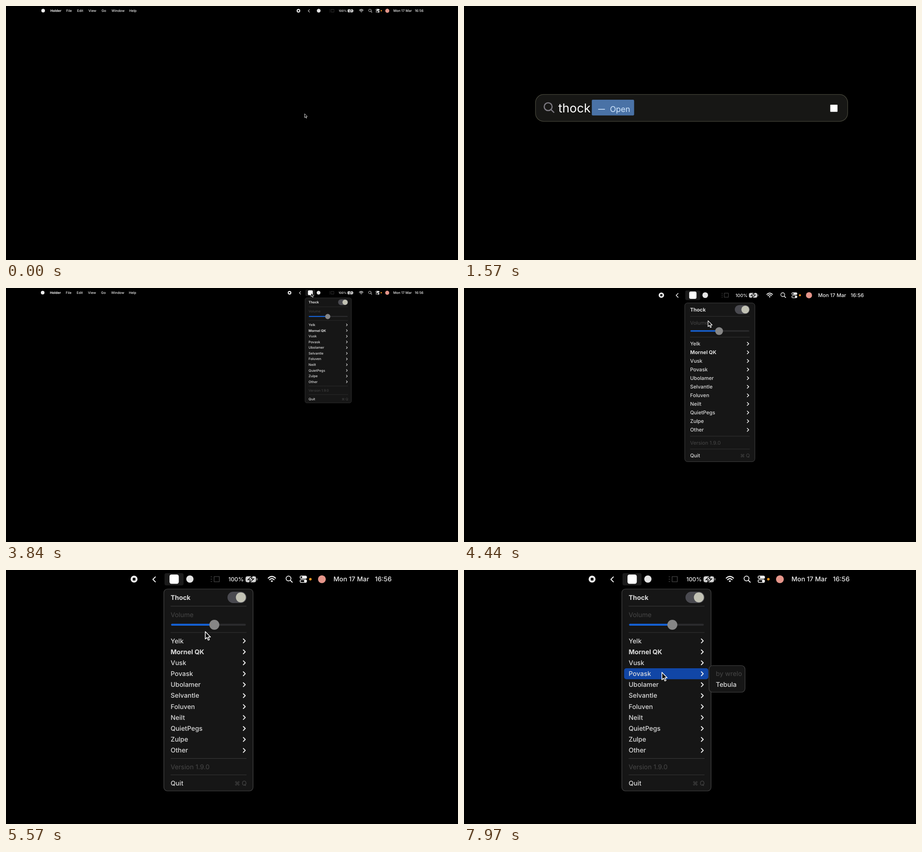
Recreate the animation shown at these times as an HTML page. Size 998x561 px, loop 8000 ms.

```html
<!DOCTYPE html>
<html lang="en">
<head>
<meta charset="utf-8">
<title>Menu bar demo</title>
<style>
  html, body { margin: 0; width: 100%; height: 100%; overflow: hidden; background: #000; }
  svg { display: block; width: 100vw; height: 100vh; }
  text { font: 500 14.3px Inter, "Open Sans", sans-serif; fill: #dcdcdc; white-space: pre; text-rendering: geometricPrecision; }
  .bar text { fill: #f0f0f0; }
  .apps text { font-size: 7.43px; }
  text.bold, .apps text.bold { font-weight: 700; }
  text.dim { fill: #474747; font-weight: 400; }
  text.tag { font-size: 11px; font-weight: 700; text-anchor: middle; }
  .line { fill: none; stroke: #f0f0f0; stroke-width: 2; stroke-linecap: round; stroke-linejoin: round; }
  .rule { stroke: #363636; stroke-width: 1.2; }
  .panel { fill: #161616; stroke: #464646; stroke-width: 1.2; }
  #query { font-size: 27px; font-weight: 400; fill: #fff; }
  #hint text { font-size: 17.5px; font-weight: 400; fill: #d3e8ff; }
</style>
</head>
<body>
<svg viewBox="0 0 998 561" preserveAspectRatio="none">
  <g id="world"></g>
  <g id="spotlight"></g>
</svg>
<script>
const LOOP = 8000, WIDTH = 998;
const ZOOM = 1.925;            // the desktop is drawn at this magnification
const SEARCH_ZOOM = 1.77;      // the search field is drawn at this one
const SEARCH_CENTER = [494.5, 100], MENU_CENTER = [WIDTH, 0];
const ROW = 24.18, FIRST_ROW = 144.5;

const $ = id => document.getElementById(id);
const text = (x, y, s, cls = '') => `<text x="${x}" y="${y}" class="${cls}">${s}</text>`;
const rect = (x, y, w, h, r, fill) => `<rect x="${x}" y="${y}" width="${w}" height="${h}" rx="${r}" fill="${fill}"/>`;
const disc = (x, y, r, fill) => `<circle cx="${x}" cy="${y}" r="${r}" fill="${fill}"/>`;
const line = (d, extra = '') => `<path class="line" d="${d}" ${extra}/>`;
const rule = (x1, x2, y) => `<path class="rule" d="M${x1} ${y}H${x2}"/>`;
const panel = (x, y, w, h) => `<rect class="panel" x="${x}" y="${y}" width="${w}" height="${h}" rx="8"/>`;
const rowBase = i => FIRST_ROW + ROW * i + 17;

const appMenu = () => {
  const items = [[133, 'File'], [157, 'Edit'], [182, 'View'], [211, 'Go'], [233, 'Window'], [272, 'Help']];
  return `<g class="apps" transform="translate(${WIDTH * (1 - ZOOM)}) scale(${ZOOM})">
    ${disc(82, 10.3, 4, '#f0f0f0')}${text(98, 13, 'Holder', 'bold')}
    ${items.map(([x, s]) => text(x, 13, s)).join('')}</g>`;
};

const statusIcons = () => `
  <g id="left-icons">
    ${disc(282.8, 20.2, 7.6, '#f0f0f0')}${rect(279.8, 17.2, 6, 6, 1.2, '#000')}
    ${line('M329.8 15.2L324.3 20.7L329.8 26.2')}
  </g>
  <g id="app-icon">
    <g id="app-active">${rect(350, 7, 42, 27, 4, '#1b1b1b')}</g>
    ${rect(361, 10, 20.5, 20.5, 4.5, '#fff')}
  </g>
  ${disc(406, 20, 8, '#e4e4e4')}
  ${line('M459.5 14.5H471V26H459.5ZM452.5 15H454.5M452.5 20.2H454.5M452.5 25.5H454.5', 'style="stroke:#3c3c3c;stroke-width:1.6"')}
  <text x="491" y="25" style="font-size:12.6px">100%</text>
  <rect x="529" y="14" width="23" height="13" rx="4" fill="#d8d8d8" stroke="#8c8c8c"/>${rect(553.5, 18, 2, 5, 1, '#777')}
  <path d="M544 12.5L534.3 21.4H539.6L537.3 28.5L547 19.4H541.6Z" fill="#f4f4f4" stroke="#000" stroke-width="1.5"/>
  ${line('M579 18Q587 10.5 595 18M582 21.3Q587 16.8 592 21.3', 'style="stroke-width:2.3"')}
  <path d="M587 27L584.2 24Q587 21.8 589.8 24Z" fill="#f0f0f0"/>
  <circle class="line" cx="623.8" cy="18.8" r="5.4" style="stroke-width:1.7"/>${line('M628 23L632 27')}
  ${rect(648.5, 12.5, 16, 7, 3.5, '#f0f0f0')}${disc(652, 16, 2, '#000')}
  <rect class="line" x="649.3" y="21.6" width="14.4" height="5.8" rx="2.9" style="stroke-width:1.5"/>
  ${disc(660.8, 24.5, 2.8, '#f0f0f0')}${disc(672, 20.3, 2.8, '#f0951f')}
  ${disc(697.5, 20.3, 8.6, '#e5958a')}
  ${text(723, 25, 'Mon 17 Mar')}
  <text x="851.5" y="25" text-anchor="end">16:56</text>`;

const mainMenu = () => {
  const makers = ['Yelk', 'Mornel QK', 'Vusk', 'Povask', 'Ubolamer', 'Selvantle',
    'Foluven', 'Neilt', 'QuietPegs', 'Zulpe', 'Other'];
  const row = (name, i) => {
    const mid = FIRST_ROW + ROW * (i + .5);
    return text(363.5, rowBase(i), name, i === 1 ? 'bold' : '') +
      line(`M524 ${mid - 4.3}L528.3 ${mid}L524 ${mid + 4.3}`);
  };
  return panel(348.5, 42, 197, 446) +
    text(363.5, 66, 'Thock', 'bold') + rect(489, 48, 42, 25, 12.5, '#4a4a50') + disc(518.5, 60.5, 11, '#c2c2b4') +
    [79.8, 138, 416.3, 452.5].map(y => rule(363.5, 531, y)).join('') +
    text(363.5, 103.5, 'Volume', 'dim') +
    rect(364.5, 118.7, 165, 4.2, 2, '#2b2b2d') +
    `<rect id="level" x="364.5" y="118.7" height="4.2" rx="2" fill="#1461d6"/>` +
    `<circle id="knob" cy="121" r="11" fill="#868686"/>` +
    `<rect id="hover" x="353.5" width="186" height="${ROW}" rx="5" fill="#1146a6"/>` +
    makers.map(row).join('') +
    text(363.5, 440, 'Version 1.9.0', 'dim') + text(363.5, 476, 'Quit') +
    `<text class="dim" x="504.5" y="476" style="font-family:'DejaVu Sans',sans-serif;font-size:12.5px">⌘</text>` +
    text(520.5, 476, 'Q', 'dim');
};

const soundMenu = () => {
  const colors = ['Black', 'Blue', 'Brown', 'Red'];
  const fresh = colors.flatMap(c => [c + ' ABS', c + ' PBT']);
  const freshRow = (name, i) => {
    const y = rowBase(i + 2);
    return text(567, y, name) + rect(690.5, y - 14.5, 43.5, 18.6, 9.3, '#2b2b2b') + text(712.3, y - 1.2, 'NEW', 'tag');
  };
  return panel(541, 163, 207, 337) + text(567, rowBase(1), 'by clackfern', 'dim') +
    fresh.map(freshRow).join('') + rule(556, 733, 392) +
    text(567, 415.6, 'by wrelo', 'dim') +
    colors.slice(0, 3).map((c, i) => text(567, 440 + ROW * i, c)).join('') +
    line('M553.5 435.5L556.5 439L561.5 430.5');
};

$('world').innerHTML = `
  <g class="bar">${appMenu()}${statusIcons()}</g>
  <g id="menu">${mainMenu()}</g>
  <g id="sounds">${soundMenu()}</g>
  <g id="single">${panel(541, 211, 79.5, 59)}${text(556, rowBase(3), 'by wrelo', 'dim')}${text(556, rowBase(4), 'Tebula')}</g>
  <path id="cursor" d="M0 0V16.4L3.8 13L6.5 19L9 17.9L6.5 12H11.5Z" fill="#000" stroke="#fff" stroke-width="1.6" stroke-linejoin="round"/>`;

$('spotlight').innerHTML = `
  <rect x="157.5" y="195.5" width="690" height="59.5" rx="18" fill="#171715" stroke="#46463a" stroke-width="1.3"/>
  <g fill="none" stroke="#7d7a82" stroke-width="2.6" stroke-linecap="round">
    <circle cx="185.5" cy="222.5" r="8.7"/><path d="M192 229L198 235"/></g>
  <text id="query" x="208" y="235.5"></text>
  <g id="hint">${rect(282, 207, 93.5, 35, 2.5, '#4a72a6')}${rect(296, 227.5, 15, 1.6, 0, '#d3e8ff')}${text(322, 234, 'Open')}</g>
  ${rect(809, 218, 16, 16, 1, '#fff')}`;

const ramp = (t, from, length) => {
  const u = Math.min(1, Math.max(0, (t - from) / length));
  return (1 - Math.cos(Math.PI * u)) / 2;
};

const show = (id, on) => $(id).setAttribute('visibility', on ? 'visible' : 'hidden');

// time, x, y
const cursorStops = [
  [2570, 346, 458], [3350, 374, 21], [3950, 374, 21], [4440, 414, 92],
  [4750, 445, 119], [4850, 445, 119], [5150, 460, 119], [5500, 440, 136],
  [5720, 440, 136], [6050, 437, 175.5], [7480, 437, 175.5], [7850, 437, 226]
];

const cursorAt = t => {
  let [, x, y] = cursorStops[0];
  for (let i = 1; i < cursorStops.length; i++) {
    const [start, x0, y0] = cursorStops[i - 1], [end, x1, y1] = cursorStops[i];
    const p = ramp(t, start, end - start);
    x += (x1 - x0) * p;
    y += (y1 - y0) * p;
  }
  return [x, y];
};

const render = t => {
  const searching = t < 2570;
  const zoomed = searching ? ramp(t, 50, 1170) - ramp(t, 1255, 1170) : ramp(t, 3815, 1170);
  const scale = 1 + (ZOOM - 1) * zoomed;
  const [cx, cy] = searching ? SEARCH_CENTER : MENU_CENTER;
  const k = scale / ZOOM;
  $('world').setAttribute('transform',
    `matrix(${k} 0 0 ${k} ${WIDTH * (ZOOM - 1) * k + (1 - scale) * cx} ${(1 - scale) * cy})`);

  $('spotlight').setAttribute('transform',
    `translate(${cx} ${cy}) scale(${scale / SEARCH_ZOOM}) translate(${-cx} ${-cy})`);
  show('spotlight', t >= 520 && t < 1650);
  $('query').textContent = 'thock'.slice(0, Math.max(0, Math.floor((t - 600) / 120)));
  $('hint').style.display = t >= 1260 ? '' : 'none';

  const launched = t >= 2620, opened = t >= 3550;
  $('left-icons').setAttribute('transform', `translate(${launched ? 0 : 37})`);
  $('app-icon').style.display = launched ? '' : 'none';
  $('app-active').style.display = opened ? '' : 'none';
  $('menu').style.display = opened ? '' : 'none';

  const [x, y] = cursorAt(t);
  $('cursor').setAttribute('transform', `translate(${x} ${y})`);
  show('cursor', t < 720 || t >= 2570);

  const volume = 445 + 15 * ramp(t, 4850, 300);
  $('knob').setAttribute('cx', volume);
  $('level').setAttribute('width', volume - 364.5);

  const row = Math.floor((y - FIRST_ROW) / ROW);
  $('hover').style.display = t > 5500 && row >= 0 ? '' : 'none';
  $('hover').setAttribute('y', FIRST_ROW + ROW * row);
  show('sounds', t >= 6040 && t < 7550);
  show('single', t >= 7830);
};

const begin = performance.now();
const tick = () => {
  render((performance.now() - begin) % LOOP);
  requestAnimationFrame(tick);
};
tick();
</script>
</body>
</html>
```
